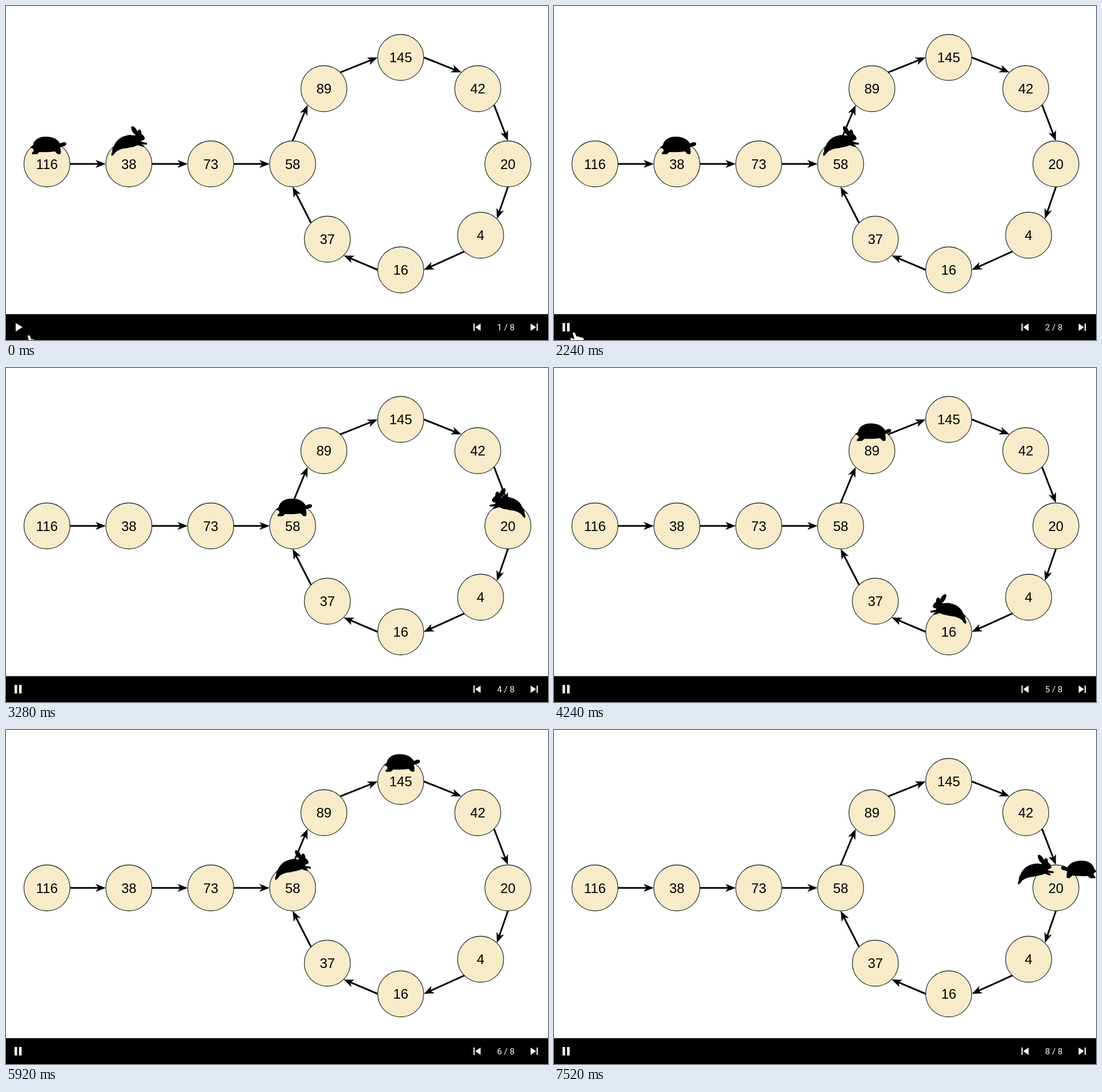
An HTML page that plays this animation: 953x588 px, repeating every 7600 ms.

```html
<!DOCTYPE html>
<html lang="en">
<head>
<meta charset="utf-8">
<title>Tortoise and hare on a cycle</title>
<style>
  html, body { margin: 0; height: 100%; overflow: hidden; background: #fff; }
  svg { display: block; width: 953px; height: 588px; }
  .node { fill: #f7ebca; stroke: #333; stroke-width: 1.3; }
  .label { font: 24px "Liberation Sans", Arial, sans-serif; text-anchor: middle; }
  .shaft { stroke: #000; stroke-width: 3; }
  .count { font: 15px Roboto, sans-serif; fill: #fff; }
</style>
</head>
<body>
<svg viewBox="0 0 953 588">
  <g id="graph"></g>
  <path id="turtle" d="M0 20 L5 17 C7 7 15 1 28 1 C42 1 49 6 53 13 L58 11 Q64 10 64 14 Q63 18 58 18 L53 20
    Q55 25 54 31 Q51 33 48 31 L44 27 Q30 29 17 28 Q14 31 12 32 L4 32 Q2 30 6 27 Q8 25 5 22 Z"/>
  <path id="hare" d="M2 53 Q0 50 3 45 Q2 40 6 35 C10 25 18 19 28 17 C34 15 39 17 44 17 Q36 10 36 2 Q37 0 40 1
    Q45 4 47 10 Q49 5 52 7 Q55 10 54 14 Q60 18 60 23 Q58 26 54 26 L54 28 Q58 29 64 30 L64 33 Q58 33 54 32
    Q59 34 59 37 Q55 37 48 34 Q42 37 34 38 Q27 40 22 40 Q14 42 9 46 Q5 52 2 53 Z"/>
  <rect y="542.5" width="953" height="46"/>
  <g fill="#fff">
    <path id="play" d="M17 558 L29 565.5 L17 573 Z"/>
    <path id="pause" d="M15 558 h4.5 v15 h-4.5 Z M23 558 h4.5 v15 h-4.5 Z"/>
    <path d="M822 559 h2 v13 h-2 Z M834.5 559 v13 L825 565.5 Z"/>
    <path d="M933 559 h2 v13 h-2 Z M922.5 559 v13 L932 565.5 Z"/>
    <path id="hand" d="M0 1 Q2 -2 4 1 L7 7.5 Q9 5.5 11 8 Q13 6.5 15 9 Q18 7.5 19 11 L22 22 H6 L-4 12 Q-5 8 -1 10 L3 12 Z"/>
  </g>
  <text id="count" class="count" x="863.6" y="570.6"></text>
</svg>
<script>
const $ = id => document.getElementById(id);
const LOOP = 7600, CLICK = 325, STEP = 975, SLIDES = 8;
const RADIUS = 40.5, TAIL = 3;

// A straight tail leads into a ring, listed clockwise from its leftmost node
const ring = [[504, 278], [559, 145.5], [694, 90.5], [829.5, 145.5], [882.5, 278], [834.5, 403.5], [694, 464.5], [565, 410.5]];
const points = [72, 216, 360].map(x => [x, 278]).concat(ring);
const CYCLE = ring.length;

const heading = i => i < TAIL ? 0 : (i - TAIL - 2) * Math.PI / 4;
const wrap = i => i < points.length ? i : TAIL + (i - TAIL) % CYCLE;
const digitSquares = n => [...String(n)].reduce((sum, d) => sum + d * d, 0);

function node([x, y], value) {
  return `<circle class="node" cx="${x}" cy="${y}" r="${RADIUS}"/>
    <text class="label" x="${x}" y="${y + 8.7}">${value}</text>`;
}

function rim(i, angle) {
  const [x, y] = points[i];
  return [x + RADIUS * Math.cos(angle), y + RADIUS * Math.sin(angle)];
}

function arrow(i) {
  const next = wrap(i + 1);
  const [x1, y1] = rim(i, heading(i));
  const [x2, y2] = rim(next, Math.PI + (i < TAIL ? 0 : heading(next)));
  const length = Math.hypot(x2 - x1, y2 - y1);
  const angle = Math.atan2(y2 - y1, x2 - x1) * 180 / Math.PI;
  return `<g transform="translate(${x2} ${y2}) rotate(${angle})">
    <path class="shaft" d="M${-length} 0 H-11"/><path d="M0 0 L-18 -7 L-13 0 L-18 7 Z"/></g>`;
}

let value = 116, graph = "";
points.forEach((point, i) => {
  graph += node(point, value) + arrow(i);
  value = digitSquares(value);
});
$("graph").innerHTML = graph;

function place(id, x, y, mirrored = false) {
  $(id).setAttribute("transform", mirrored ? `translate(${x + 64} ${y}) scale(-1 1)` : `translate(${x} ${y})`);
}

function show(id, visible) {
  $(id).style.display = visible ? "" : "none";
}

const progress = (t, from, to) => Math.min(1, Math.max(0, (t - from) / (to - from)));

function render(t) {
  const slide = Math.max(0, Math.min(SLIDES - 1, Math.floor((t - CLICK) / STEP)));
  const slow = slide, fast = wrap(1 + 2 * slide);
  const met = slow === fast;  // they sit side by side, face to face
  const [tx, ty] = points[slow], [hx, hy] = points[fast];
  place("turtle", tx - 30 + (met ? 39 : 0), ty - 49, met);
  place("hare", hx - 32 - (met ? 36 : 0), hy - (met ? 59 : 67), !met && fast >= TAIL + CYCLE / 2);
  $("count").textContent = `${slide + 1} / ${SLIDES}`;
  show("play", t < CLICK);
  show("pause", t >= CLICK);

  const arrive = progress(t, 0, 300);
  const leave = progress(t, 2600, 2940) ** 2;
  place("hand", 38 - 5 * arrive - 50 * leave, 580 - 5 * arrive + 8 * leave);
  show("hand", leave < 1);
}

function tick() {
  render(performance.now() % LOOP);
  requestAnimationFrame(tick);
}
tick();
</script>
</body>
</html>
```
